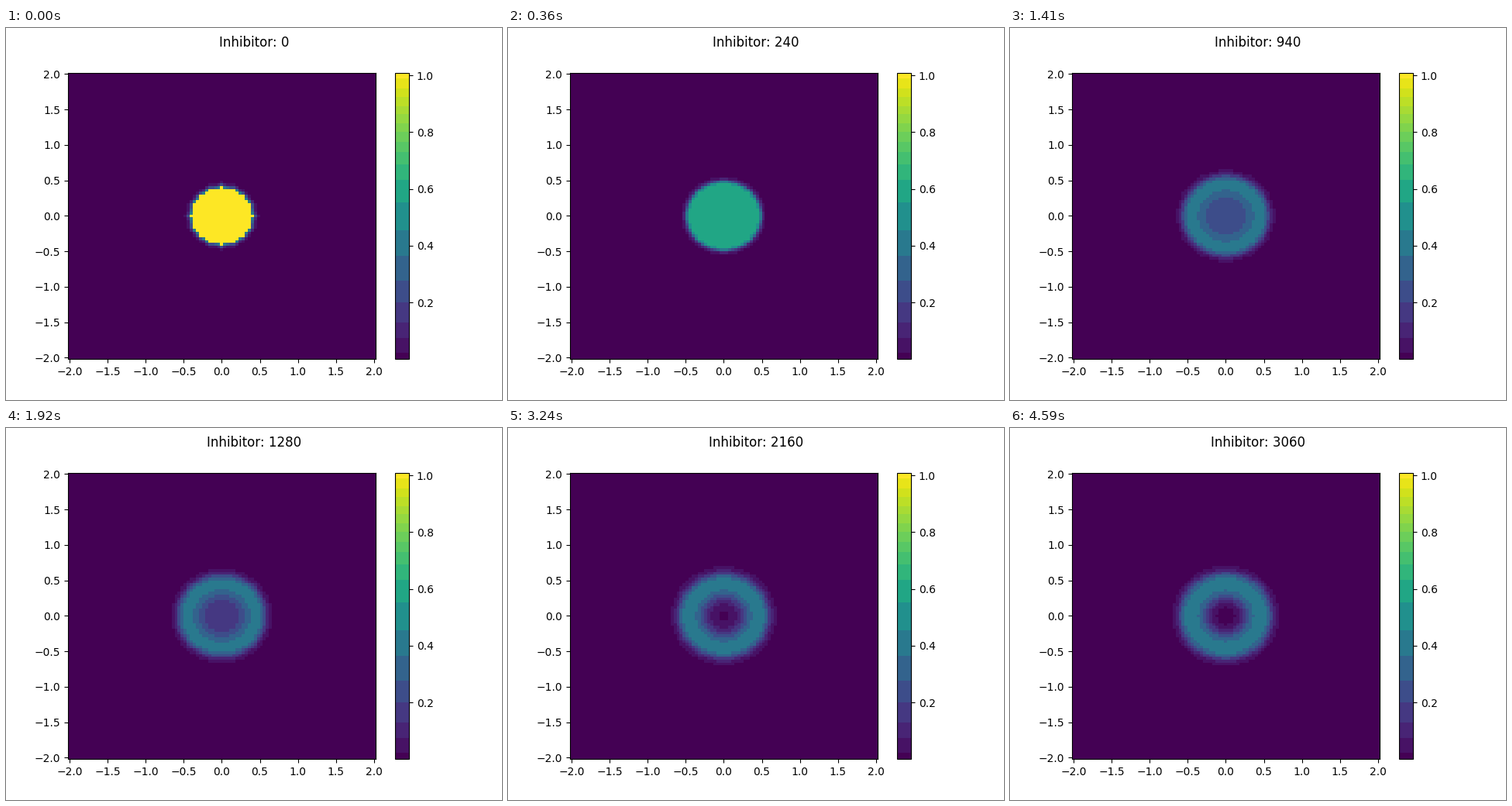
Write a matplotlib script that moves like this. It is 640 px wide and 480 px high and loops after 4620 ms.

```python
import numpy as np
import matplotlib.pyplot as plt
from matplotlib.animation import FuncAnimation
from matplotlib.colors import ListedColormap

FRAMES, INTERVAL, STEPS = 154, 30, 20
HALF = 50  # cells on each side of the centre
VMIN, VMAX = 0.001, 1.0095
BANDS = 20


def banded_viridis():
    """Viridis reduced to colours evenly spaced along its path through RGB."""
    rgb = plt.get_cmap("viridis")(np.linspace(0, 1, 512))[:, :3]
    path = np.cumsum(np.linalg.norm(np.diff(rgb, axis=0, prepend=rgb[:1]), axis=1))
    path /= path[-1]
    stops = np.round(path * (BANDS - 1)) / (BANDS - 1)
    return ListedColormap(np.column_stack([np.interp(stops, path, c) for c in rgb.T]))


cells = np.arange(-HALF, HALF + 1)
cx, cy = np.meshgrid(cells, cells)
radius = np.hypot(cx, cy)


def start_disc(bleed=0.11, passes=3):
    """Solid disc whose rim has bled slightly into its neighbours."""
    disc = (radius < 10) | ((radius == 10) & (cx * cy == 0))
    field = disc.astype(float)
    for _ in range(passes):
        around = sum(np.roll(field, s, axis=a) for s in (-1, 1) for a in (0, 1))
        field = field + bleed * (around - 4 * field)
        field[disc] = 1
    return field


def ring(step):
    """Spreading soft-edged disc that decays while its centre hollows out."""
    growth = step / (step + 400)
    edge = 10.1 + 5.5 * growth
    softness = 0.1 + 0.95 * growth
    outer = 1 / (1 + np.exp((radius - edge) / softness))

    depth = 0.985 * np.sin(np.pi / 2 * min(step / 2600, 1))
    width = 7.5 + 1.8 / (1 + (step / 1300) ** 4)
    well = 1 - depth * np.exp(-(radius / width) ** 3.5)

    peak = 0.43 + 0.57 * np.exp(-step / 260)
    return peak * outer * well


start = start_disc()


def field_at(step):
    mix = np.exp(-step / 40)
    return mix * start + (1 - mix) * ring(step)


fig, ax = plt.subplots(figsize=(6.4, 4.8), dpi=100)
axis = np.linspace(-2, 2, 2 * HALF + 1)
mesh = ax.pcolormesh(axis, axis, field_at(0), cmap=banded_viridis(),
                     vmin=VMIN, vmax=VMAX, shading="nearest")
fig.colorbar(mesh, ax=ax)
title = fig.suptitle("Inhibitor: 0")


def update(frame):
    step = frame * STEPS
    mesh.set_array(field_at(step))
    title.set_text(f"Inhibitor: {step}")
    return mesh, title


anim = FuncAnimation(fig, update, frames=FRAMES, interval=INTERVAL,
                     repeat=True, repeat_delay=0, blit=False)
plt.show()
```
